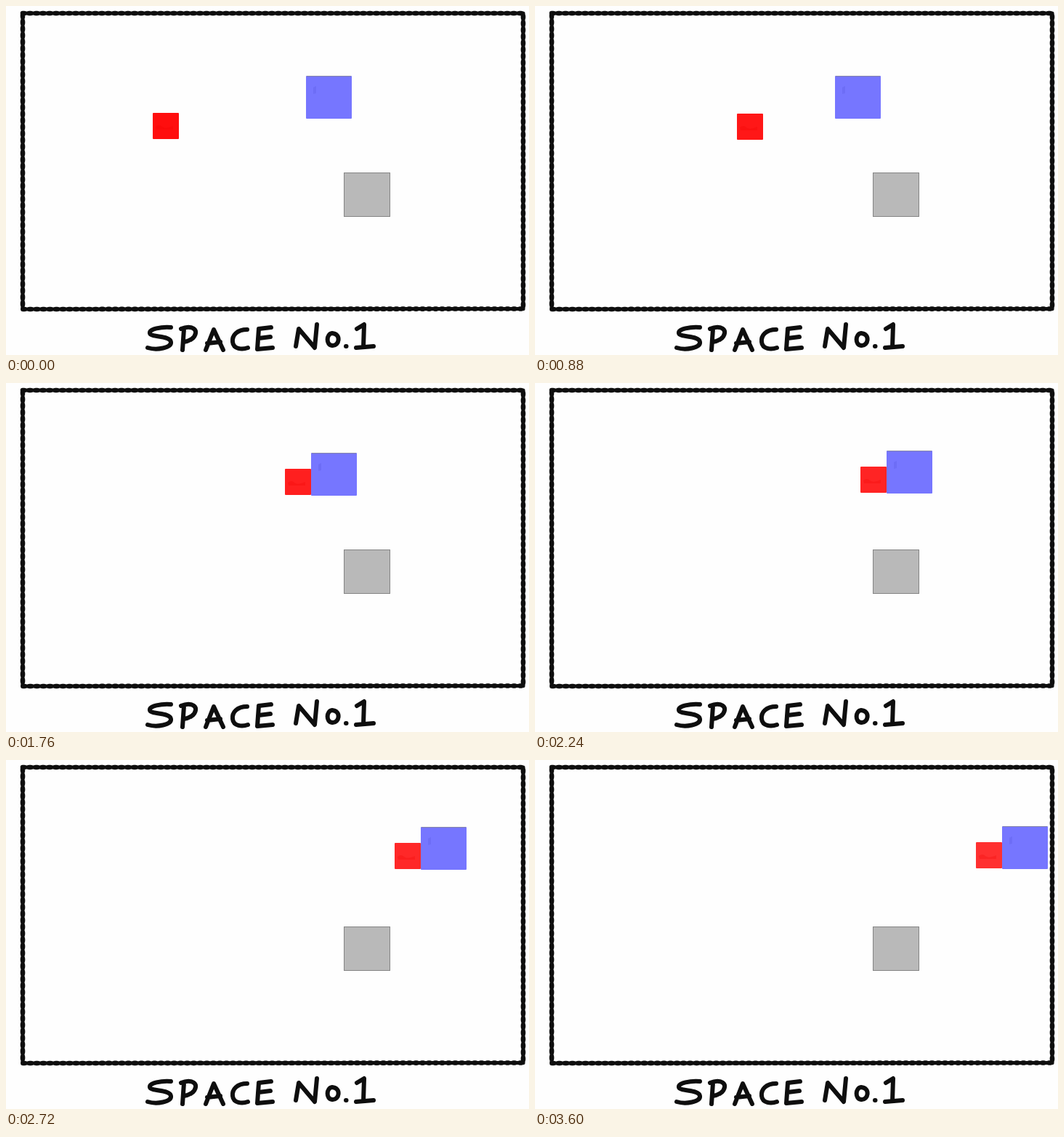
Write an HTML page that moves like this. It is 720 px wide and 480 px high and loops after 4020 ms.

```html
<!DOCTYPE html>
<html lang="en">
<head>
<meta charset="utf-8">
<title>Space No.1</title>
<style>
  html, body { margin: 0; width: 100%; height: 100%; overflow: hidden; background: #fff; }
  svg { display: block; width: 720px; height: 480px; }
  .ink { fill: none; stroke: #0e0e0e; stroke-linecap: round; stroke-linejoin: round; }
</style>
</head>
<body>
<svg viewBox="0 0 720 480" role="img" aria-label="SPACE No.1">
  <defs>
    <path id="frame" d="M23 10H712V416.5L23 417Z"/>
  </defs>
  <rect width="720" height="480" fill="#fefefe"/>

  <use href="#frame" class="ink" stroke-width="5.2"/>
  <use href="#frame" class="ink" stroke-width="6.6" stroke-dasharray="2 7"/>

  <g class="ink" stroke-width="6">
    <path d="M227 442C214 441 197 444 198 450C199 456 226 453 227 462C228 470 208 474 195 470"/>
    <path d="M245 444L243 473M241 444C253 439 262 443 261 450C260 457 252 461 245 462"/>
    <path d="M275 473L286 445L299 473M277 464L295 462"/>
    <path d="M332 445C318 445 311 453 312 462C313 472 325 473 333 470"/>
    <path d="M348 444L346 472M348 444L365 442M348 457L364 455M346 472L367 470"/>
    <path d="M399 468L403 444L425 470L428 438"/>
    <path d="M449 450C441 451 440 466 449 467C459 468 462 451 449 450Z"/>
    <path d="M468 468h.5"/>
    <path d="M483 444L493 438L492 469M482 470L506 468"/>
  </g>

  <rect x="465.5" y="229.5" width="63" height="60" fill="#b9b9b9" stroke="#858585"/>

  <g id="red">
    <rect width="36" height="36" rx="1"/>
    <path d="M4 19Q9 15 13 19T28 18V23H5Z" fill="#e00" opacity=".25"/>
  </g>
  <g id="blue">
    <rect width="63" height="59" rx="1" fill="#7676ff"/>
    <path d="M1 .5H62" stroke="#8585a8"/>
    <path d="M10 16L14 14V24L10 25Z" fill="#6868f0" opacity=".6"/>
  </g>
</svg>

<script>
const LOOP = 4020, STEP = 80, LAST = 44;
const red = document.getElementById('red');
const blue = document.getElementById('blue');

// Monotone cubic through [step, value] keys.
function curve(keys) {
  const n = keys.length - 1;
  const d = keys.slice(1).map((k, i) => (k[1] - keys[i][1]) / (k[0] - keys[i][0]));
  const m = keys.map((_, i) => {
    if (i === 0) return d[0];
    if (i === n) return d[n - 1] * 0.4;
    const a = d[i - 1], b = d[i];
    return a * b > 0 ? 2 * a * b / (a + b) : 0;
  });
  return s => {
    let i = 0;
    while (i < n - 1 && s > keys[i + 1][0]) i++;
    const [s0, v0] = keys[i], [s1, v1] = keys[i + 1];
    const h = s1 - s0, u = (s - s0) / h, w = 1 - u;
    return v0 * w * w * (1 + 2 * u) + v1 * u * u * (3 - 2 * u)
      + h * u * w * (m[i] * w - m[i + 1] * u);
  };
}

const redX = curve([[0, 202], [11, 278], [22, 384], [28, 448], [34, 535], [38, 586], [44, 607]]);
const redY = curve([[0, 147], [11, 148], [14, 147], [21, 118], [22, 118], [28, 115], [34, 114], [38, 114], [44, 113]]);

const place = (el, x, y) => el.setAttribute('transform', `translate(${x} ${y})`);

function draw(now) {
  let s = Math.floor(now % LOOP / STEP);
  if (s > 36) s--; // one pose is held for two beats
  s = Math.min(s, LAST);

  const x = Math.round(redX(s)), y = Math.round(redY(s));
  const tint = Math.round(14 + 34 * s / LAST);
  place(red, x, y);
  red.setAttribute('fill', `rgb(255,${tint},${tint})`);

  // The red square pushes the blue one once they touch.
  const pushed = x + 36 >= 413;
  place(blue, pushed ? x + 36 : 413, pushed ? Math.min(96, y - 22) : 96);
}

let start;
function tick(now) {
  start ??= now;
  draw(now - start);
  requestAnimationFrame(tick);
}
draw(0);
requestAnimationFrame(tick);
</script>
</body>
</html>
```
